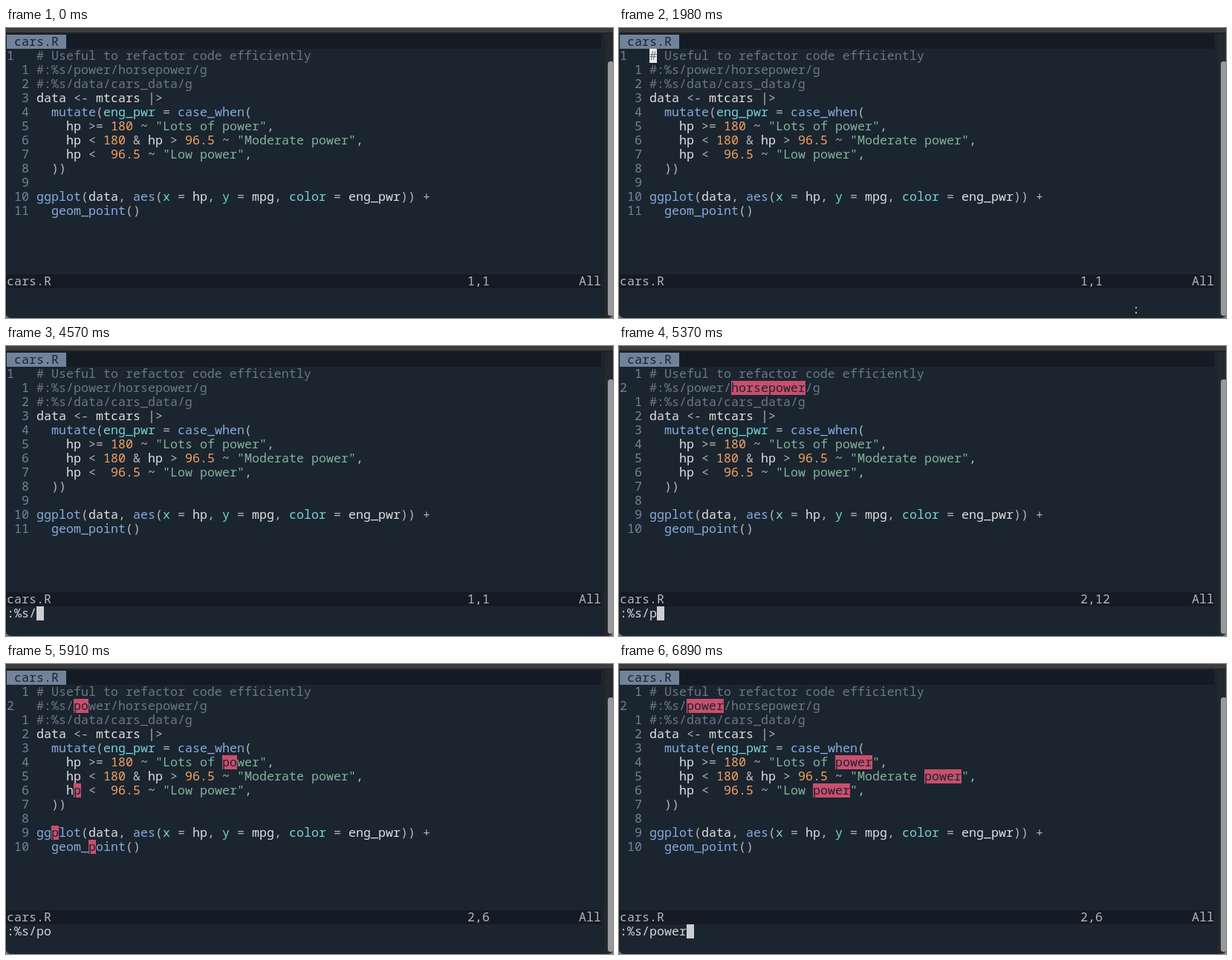
Recreate the animation shown at these times as an HTML page. Size 817 px wide and 391 px high, loop 8000 ms.

```html
<!DOCTYPE html>
<html lang="en">
<head>
<meta charset="utf-8">
<title>Substitute preview</title>
<style>
html, body { margin: 0; width: 100%; height: 100%; overflow: hidden; background: #1b2530; }
svg { display: block; width: 817px; height: 391px; }
text {
  font: 500 16.667px "Noto Sans Mono", "DejaVu Sans Mono", monospace;
  font-variant-ligatures: none;
  white-space: pre;
}
</style>
</head>
<body>
<svg id="stage" viewBox="0 0 817 391"></svg>
<script>
const LOOP = 8000, CW = 10, LH = 19, LEFT = 1, TOP = 9, GUTTER = 4;
const C = {
  bg: '#1b2530', bar: '#141b24', dim: '#71839b', comment: '#6b7787', fg: '#d3d4d5',
  name: '#dfdfe0', punct: '#b4b6b8', func: '#86abdc', arg: '#74d2d5',
  num: '#f4a261', str: '#81b29a', hit: '#c94f6d', block: '#cdcecf'
};

const code = `# Useful to refactor code efficiently
#:%s/power/horsepower/g
#:%s/data/cars_data/g
data <- mtcars |>
  mutate(eng_pwr = case_when(
    hp >= 180 ~ "Lots of power",
    hp < 180 & hp > 96.5 ~ "Moderate power",
    hp <  96.5 ~ "Low power",
  ))

ggplot(data, aes(x = hp, y = mpg, color = eng_pwr)) +
  geom_point()`.split('\n');

// [start ms, command, preview pattern, cursor shown]
const steps = [
  [0, '', '', false],
  [20, '', '', true],
  [1980, '', '', true],
  [3170, ':%', '', true],
  [3610, ':%s', '', true],
  [4570, ':%s/', '', true],
  [4670, ':%s/', 'horsepower', true],
  [5370, ':%s/p', 'horsepower', true],
  [5470, ':%s/p', 'p', true],
  [5810, ':%s/po', 'p', true],
  [5910, ':%s/po', 'po', false],
  [6150, ':%s/pow', 'po', true],
  [6250, ':%s/pow', 'pow', true],
  [6480, ':%s/powe', 'pow', true],
  [6580, ':%s/powe', 'powe', true],
  [6790, ':%s/power', 'powe', true],
  [6890, ':%s/power', 'power', true]
];

const rect = (x, y, w, h, fill, rx = 0) =>
  `<rect x="${x}" y="${y}" width="${w}" height="${h}" rx="${rx}" fill="${fill}"/>`;
const cells = (col, row, n, fill) => rect(LEFT + col * CW, TOP + row * LH, n * CW, LH, fill);
const esc = s => s.replace(/&/g, '&amp;').replace(/</g, '&lt;');
const put = (col, row, s, fill) =>
  `<text x="${LEFT + col * CW}" y="${TOP + row * LH + 15}" fill="${fill}">${esc(s)}</text>`;

const token = /(?<str>"[^"]*")|(?<num>\d[\d.]*)|(?<func>\w+(?=\())|(?<arg>\w+(?= = ))|(?<name>\w+)|(?<punct>[^\s\w"]+)/g;

function codeLine(line, i) {
  if (line[0] === '#') return put(GUTTER, i + 1, line, C.comment);
  return [...line.matchAll(token)].map(m => {
    const kind = Object.keys(m.groups).find(k => m.groups[k]);
    return put(GUTTER + m.index, i + 1, m[0], C[kind]);
  }).join('');
}

const backdrop =
  rect(0, 0, 817, 391, C.bg) +
  rect(0, 0, 817, 6, '#3b3c3e') + rect(0, 6, 817, 2, '#202225') +
  rect(0, 8, 1, 383, '#151c25') +
  rect(1, 8, 800, 20, C.bar) + cells(0, 0, 8, C.dim) + put(1, 0, 'cars.R', C.bg) +
  cells(0, 17, 80, C.bar) + put(0, 17, 'cars.R', C.punct) + put(77, 17, 'All', C.punct) +
  rect(806, 8, 11, 383, '#26282b') + rect(810, 45, 8, 343, '#97999b', 3.5) +
  '<path d="M0 386Q1 390 6 391H0ZM817 386Q816 390 811 391H817Z" fill="#77797c"/>' +
  code.map(codeLine).join('');

function lineNumbers(current) {
  return code.map((_, i) => i === current
    ? put(0, i + 1, String(i + 1), C.dim)
    : put(1, i + 1, String(Math.abs(i - current)).padStart(2), C.dim)).join('');
}

function highlight(pattern, line, i) {
  const col = pattern ? line.indexOf(pattern) : -1;
  if (col < 0) return '';
  return cells(GUTTER + col, i + 1, pattern.length, C.hit) +
    put(GUTTER + col, i + 1, pattern, C.bg);
}

// While the preview is half redrawn, the lower lines keep the old pattern.
function patternAt(i, pattern, partial) {
  if (!partial || i < 6) return pattern;
  return i === 6 ? '' : pattern.slice(0, -1);
}

function draw(t) {
  const [start, cmd, pattern, cursor] = steps.findLast(s => s[0] <= t);
  const partial = cmd && !cursor;
  const pos = !pattern ? '1,1' : pattern === 'horsepower' ? '2,12' : '2,6';
  let out = lineNumbers(pattern ? 1 : 0) + put(62, 17, pos, C.punct) + put(0, 18, cmd, C.fg);
  out += code.map((l, i) => highlight(patternAt(i, pattern, partial), l, i)).join('');
  if (cursor && cmd) out += cells(cmd.length, 18, 1, C.block);
  if (cursor && !cmd) out += cells(GUTTER, 1, 1, '#ececec') + put(GUTTER, 1, '#', C.comment);
  if (start === 1980) out += put(69, 19, ':', C.fg);
  return out;
}

const stage = document.getElementById('stage');
stage.innerHTML = backdrop + '<g></g>';
const live = stage.lastElementChild;
const t0 = performance.now();
let shown = '';

function tick() {
  const next = draw(Math.max(0, performance.now() - t0) % LOOP);
  if (next !== shown) live.innerHTML = shown = next;
  requestAnimationFrame(tick);
}
tick();
</script>
</body>
</html>
```
